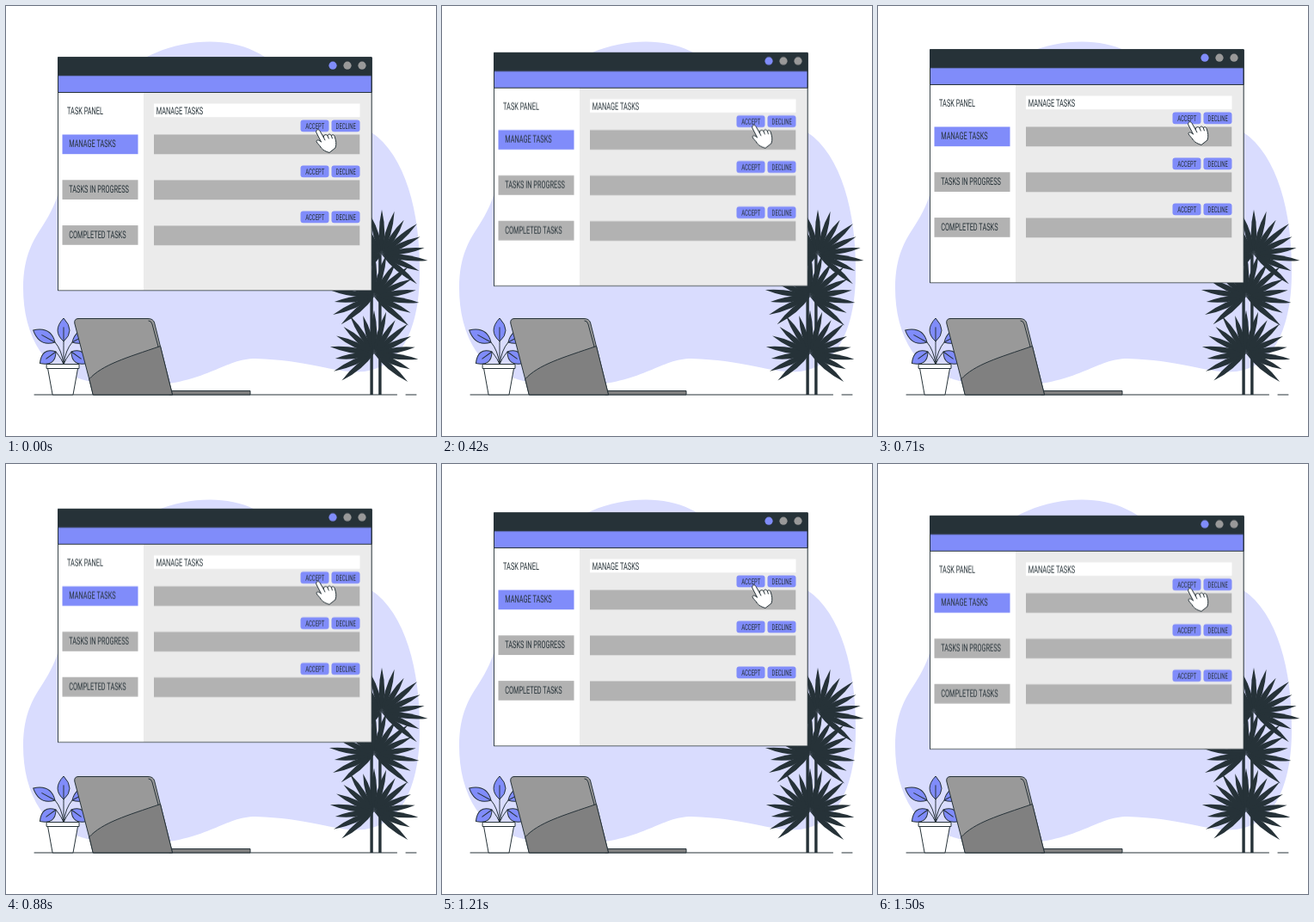
These frames come from a looping animation (500 by 500 pixels, 1540 ms). An HTML page:

```html
<!DOCTYPE html>
<html lang="en">
<head>
<meta charset="utf-8">
<title>Task panel</title>
<style>
  html, body { margin: 0; width: 100%; height: 100%; overflow: hidden; background: #fff; }
  svg { display: block; width: 100vw; height: 100vh; }
  .line { stroke: #263238; stroke-linejoin: round; stroke-linecap: round; }
  .none { fill: none; }
  .dark { fill: #263238; }
  .accent { fill: #808cfa; }
  .bar { fill: #b2b2b2; }
  .white { fill: #fff; }
  .light { fill: #ebebeb; }
  .dot { fill: #999; }
  text {
    fill: #263238;
    font: 400 12px Roboto, "Open Sans", sans-serif;
    text-rendering: geometricPrecision;
  }
  .small { font-size: 9.6px; text-anchor: middle; }
  #panel { animation: hover 770ms linear -42ms infinite alternate; }
  @keyframes hover {
    from { transform: translateY(.25px); }
    to { transform: translateY(-9.75px); }
  }
</style>
</head>
<body>
<svg viewBox="0 0 500 500" xmlns="http://www.w3.org/2000/svg">
  <path fill="#d9dcfe" d="M237 41.500C275 41.500 306 56 330 85C360 118 396 127 425 147C464 173 482 240 481 310C481 370 462 427 405 425.500C375 424 350 412 290 410C255 410 235 437 170 441C110 446 60 432 40 402C26 381 20 355 20 328C20 290 32 272 43 255C52 241 58 228 62 214C85 170 90 130 120 95C150 58 195 41.500 237 41.500Z"/>
  <path class="line none" d="M33 452H454.500M465 452H477"/>

  <g id="palm" class="dark"></g>

  <g id="plant" class="line accent"></g>
  <path class="line white" d="M49 421.500H83.500L78 452H54.500ZM47.500 416.500H85V421.500H47.500Z"/>

  <g class="line">
    <path fill="#808080" d="M190 447.500H284V452H190Z"/>
    <path fill="#999" d="M84 363.500H165Q171 363.500 172.500 368L193.500 452H101.500L79.800 369Q79 363.500 84 363.500Z"/>
    <path fill="#808080" d="M97 433.500C112 417 140 409 179.500 395.500L193.500 452H101.500Z"/>
    <path class="none" d="M166 366Q169 366 170 370L177 396"/>
  </g>

  <g id="panel">
    <g id="content"></g>
    <g class="line">
      <path class="white" d="M360.700 147.200C360 144.200 363.300 143 365 145.800L369.400 153.400C369 150.200 372.600 149 374 151.600C374.300 149.200 377.400 148.800 378.400 151.400C379.400 149.600 381.600 150 382.200 152.400C383.600 157 384.600 160.500 383 165.500L376 171C372 169.800 369 168.500 366.500 165.500C364.500 162 362 160.500 361 158C361 155.800 364 156 366.300 158.400Z"/>
      <path class="none" d="M369.400 153.400l1.500 3M374 151.600l1.300 3M378.400 151.400l1 3"/>
    </g>
  </g>
</svg>
<script>
const [palm, plant, content] = ['palm', 'plant', 'content'].map(id => document.getElementById(id));

function add(parent, tag, attrs, text = '') {
  const el = document.createElementNS('http://www.w3.org/2000/svg', tag);
  for (const key in attrs) el.setAttribute(key, attrs[key]);
  el.textContent = text;
  parent.append(el);
}

const rect = (parent, x, y, width, height, cls = '', rx = 0) =>
  add(parent, 'rect', { x, y, width, height, rx, class: cls });

// All lettering shares one condensed proportion.
const label = (x, y, text, cls = '') =>
  add(content, 'text', { transform: `translate(${x} ${y}) scale(.612 1)`, class: cls }, text);

// Pointed leaf growing from (x, y), angle in degrees clockwise from the right.
function leaf(parent, x, y, angle, length, width, vein = '') {
  const mid = length * .45;
  add(parent, 'path', {
    transform: `translate(${x} ${y}) rotate(${angle})`,
    d: `M0 0Q${mid} ${-width} ${length} 0Q${mid} ${width} 0 0${vein}`,
  });
}

// Palm crown: leaves fan out everywhere except straight down.
function crown(x, y, radius, count = 17) {
  for (let i = 0; i < count; i++) {
    const angle = 140 + 260 * i / (count - 1);
    leaf(palm, x, y, angle, radius * (1 + .07 * Math.sin(i * 2.4)), 6.5);
  }
}

rect(palm, 423.4, 330, 3.4, 122);
rect(palm, 433.2, 290, 3.4, 162);
crown(437, 289, 51);
crown(428, 338, 50);
crown(428, 404, 49);

// Potted plant: one upright leaf and two mirrored pairs, each on a stem.
function sprout(x, y, tilt, length) {
  add(plant, 'path', { class: 'none', d: `M${x} ${y}Q${x + (67 - x) * .8} ${y + 9} 67 417` });
  leaf(plant, x, y, tilt - 90, length, 14, `H${length * .6}`);
}
sprout(67, 390, 0, 27);
for (const side of [-1, 1]) {
  sprout(67 + side * 10, 391, side * 61, 29);
  sprout(67 + side * 9, 402, side * 126, 23);
}

// Window frame
rect(content, 60.8, 60.3, 364.4, 271.2, 'light');
rect(content, 61, 101, 99, 230, 'white');
rect(content, 172, 114, 239.5, 15.7, 'white');
rect(content, 60.8, 60.3, 364.4, 21, 'line dark');
rect(content, 60.8, 81.3, 364.4, 19.7, 'line accent');
rect(content, 60.8, 60.3, 364.4, 271.2, 'line none');
for (let i = 0; i < 3; i++) {
  add(content, 'circle', { cx: 380 + i * 17, cy: 69.7, r: 4.6, class: i ? 'dot' : 'accent' });
}

label(71, 126.4, 'TASK PANEL');
label(174.8, 126.4, 'MANAGE TASKS');

['MANAGE TASKS', 'TASKS IN PROGRESS', 'COMPLETED TASKS'].forEach((name, i) => {
  const side = 150 + i * 52.8;
  rect(content, 65.5, side, 88, 22.7, i ? 'bar' : 'accent');
  label(73.2, side + 14.5, name);

  const row = 150 + i * 53;
  rect(content, 172, row, 239.3, 22.8, 'bar');
  ['ACCEPT', 'DECLINE'].forEach((word, j) => {
    const x = 342.5 + j * 36;
    rect(content, x, row - 17, 33, 13.8, 'accent', 3);
    label(x + 16.7, row - 6.8, word, 'small');
  });
});
</script>
</body>
</html>
```
